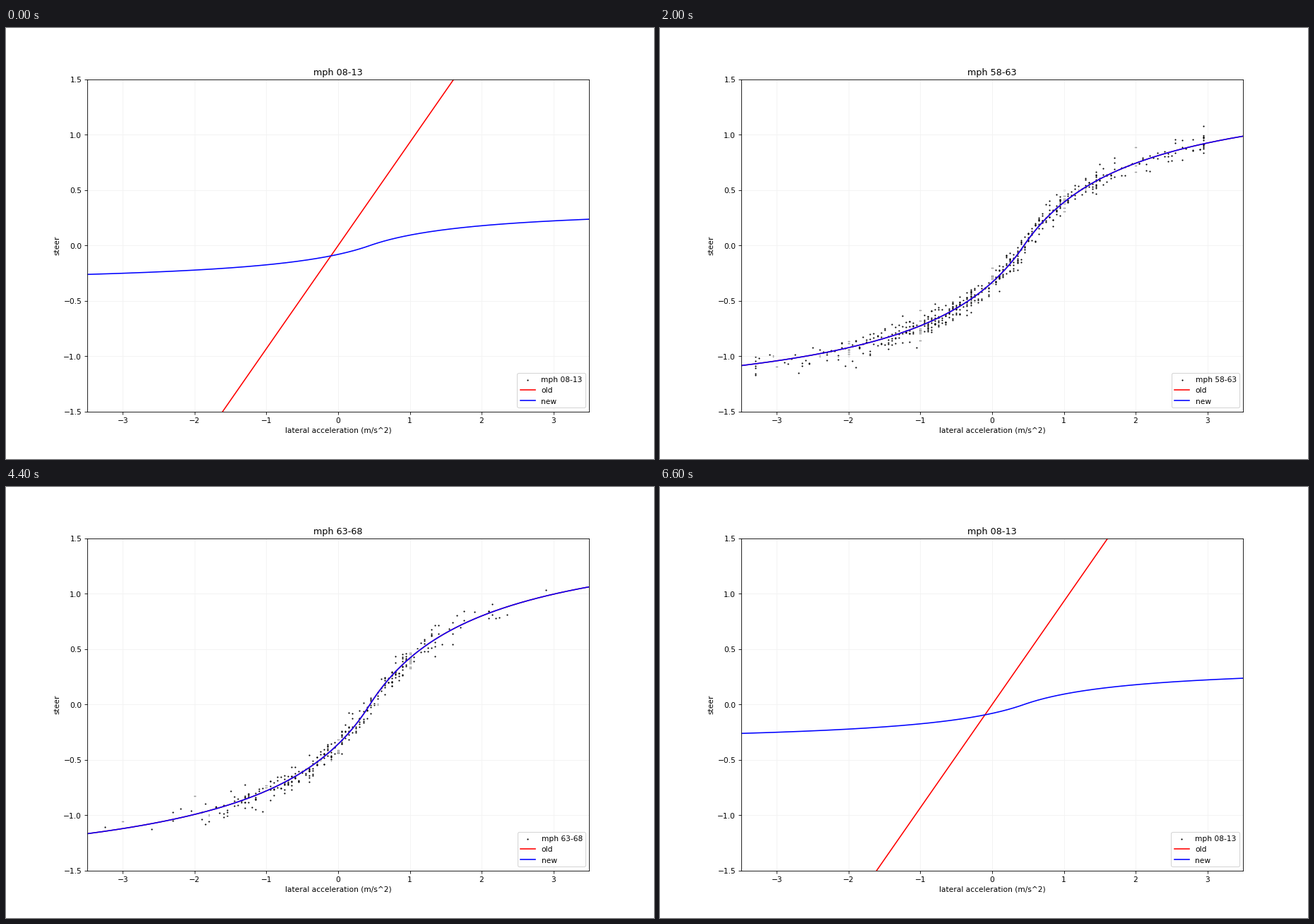
Write a matplotlib script that moves like this. It is 917 px wide and 611 px high and loops after 6800 ms.

```python
import numpy as np
import matplotlib.pyplot as plt
from matplotlib.animation import FuncAnimation

SIZE, DPI = (12, 8), 76.42  # 917 x 611 pixels
SPEEDS = list(range(8, 89, 5))
STEPS = SPEEDS + SPEEDS[::-1]  # sweep up, then back down
FRAME_MS = 200

x = np.linspace(-3.5, 3.5, 701)


def new_steer(accel, speed):
    s = .632 * (accel - .443)
    gain = np.where(s > 0, 1.955, 1.982) * (speed + 7.84) / 85.84
    return gain * s / (1 + np.abs(s))


def old_steer(accel, speed):
    """Linear at low speed, fading into the sigmoid."""
    mix = np.clip((50.5 - speed) / 42.5, 0, 1) ** 1.2
    return mix * .932 * accel + (1 - mix) * new_steer(accel, speed)


def samples(speed):
    """Noisy readings around the curves, densest near highway speed."""
    rng = np.random.default_rng(speed)
    highway = np.exp(-((speed - 58) / 5) ** 2)
    count = int(200 * np.clip((speed - 8) / 30, 0, 1) + 330 * highway)
    accel = rng.normal(-.05, .75 + .65 * highway, count)
    accel = np.round(accel.clip(-3.3, 2.95) * 20) / 20
    centre = (old_steer(accel, speed) + new_steer(accel, speed)) / 2
    noise = np.interp(speed, [38, 58], [.085, .055])
    return np.column_stack([accel, centre + rng.normal(0, noise, count)])


fig, ax = plt.subplots(figsize=SIZE, dpi=DPI)
dots = ax.scatter([], [], s=1, color="black", label="mph 08-13")
old_line, = ax.plot(x, x, color="red", label="old")
new_line, = ax.plot(x, x, color="blue", label="new")
ax.set(xlim=(-3.5, 3.5), ylim=(-1.5, 1.5),
       xlabel="lateral acceleration (m/s^2)", ylabel="steer")
ax.grid(color="0.95")
title = ax.set_title("")
legend = ax.legend(loc="lower right")
clouds = {speed: samples(speed) for speed in SPEEDS}


def draw(i):
    speed = STEPS[i]
    label = f"mph {speed:02d}-{speed + 5:02d}"
    title.set_text(label)
    legend.get_texts()[0].set_text(label)
    dots.set_offsets(clouds[speed])
    old_line.set_ydata(old_steer(x, speed))
    new_line.set_ydata(new_steer(x, speed))
    return dots, old_line, new_line, title, legend


anim = FuncAnimation(fig, draw, frames=len(STEPS), interval=FRAME_MS,
                     repeat=True, repeat_delay=0)
plt.show()
```
